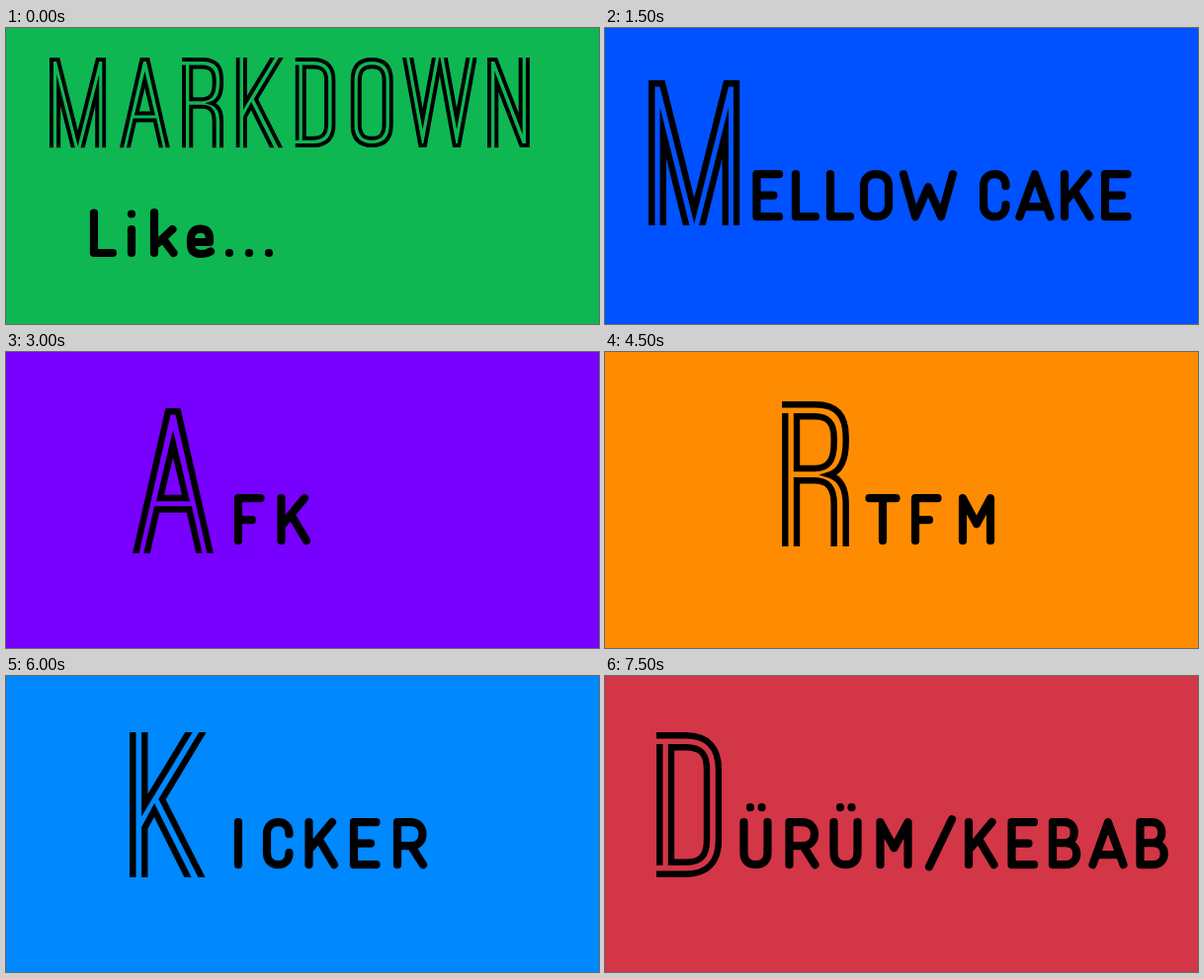
Animation, 600 px wide and 300 px high, one loop 8000 ms. Source, as an HTML page:

```html
<!DOCTYPE html>
<html lang="en">
<head>
<meta charset="utf-8">
<title>Markdown like...</title>
<style>
html, body { margin: 0; width: 100%; height: 100%; overflow: hidden; }
#stage { display: block; width: 600px; height: 300px; fill: none; stroke: #000; stroke-miterlimit: 10; }
.inline { stroke-width: 6.4; }
.round { stroke-width: 8.2; stroke-linecap: round; stroke-linejoin: round; }
</style>
</head>
<body>
<svg id="stage" viewBox="0 0 600 300" role="img"></svg>
<script>
// Striped capitals: [width, path], 147 units tall; limbs overrun the edge and are clipped flat.
const STRIPED = {
  M: [92.5, 'M3.3 152V3.3H14L46.3 132 78.6 3.3H89.2V152M14.8 152V53L39.5 152M53.1 152L77.8 53V152'],
  A: [82, 'M2.2 152L36 3.3H46L79.8 152M13.4 152L24.6 102.5H57.4L68.6 152M28 91L41 36 54 91Z'],
  R: [68, 'M0 3.3H34C56 3.3 64.7 15 64.7 36V41C64.7 60 59 71 48 74.5C59 78 64.7 88 64.7 104V152' +
          'M3.3 12V152M15 15.3H33C47 15.3 52.7 22 52.7 37V42C52.7 60 47 68 33 68H15Z' +
          'M15 152V80.3H33C47 80.3 52.7 88 52.7 104V152'],
  K: [78, 'M3.3 0V147M15.3 -5V74L63 -5M77 -5L33 68 77 155M15.3 152V97L25 79 63 155'],
  D: [66.5, 'M0 3.3H30C53 3.3 63 17 63 38V109C63 130 53 143.7 30 143.7H0M3.3 12V135' +
            'M15 15.3H30C46 15.3 51 23 51 38V109C51 124 46 131.7 30 131.7H15Z'],
  O: [70, 'M3.3 38C3.3 15 14 3.3 35 3.3S66.7 15 66.7 38V109C66.7 132 56 143.7 35 143.7S3.3 132 3.3 109Z' +
          'M15 38C15 22 21 15 35 15S55 22 55 38V109C55 125 49 132 35 132S15 125 15 109Z'],
  W: [122, 'M2.4 -5L29.5 143.7H37L61 12 85 143.7H92.5L119.6 -5M14 -5L33.2 100 52.4 -5M69.6 -5L88.8 100 108 -5'],
  N: [69.3, 'M3.3 152V3.3H14L54.3 108V-5M66 -5V143.7H55.3L15 39V152']
};

// Rounded capitals, drawn along the middle of the stroke.
const U = 'M0 0V31C0 39 5 43 12 43S24 39 24 31V0';
const ROUNDED = {
  A: 'M0 43L15.5 0 31 43M5 33H26',
  B: 'M0 21H13C28 21 28 43 13 43H0V0H12C25 0 25 21 12 21',
  C: 'M22.5 12C22.5 4 18 0 11.5 0S0 4 0 12V31C0 39 5 43 11.5 43S22.5 39 22.5 31',
  E: 'M22.5 0H0V43H22.5M0 21.5H17',
  F: 'M22.5 0H0V43M0 22H14',
  I: 'M0 0V43',
  K: 'M0 0V43M23.5 0L2 26M10 17L25.5 43',
  L: 'M0 0V43H20',
  M: 'M0 43V0L14 26 28 0V43',
  O: 'M0 12C0 4 5 0 12.5 0S25 4 25 12V31C25 39 20 43 12.5 43S0 39 0 31Z',
  R: 'M0 43V0H13C21 0 25.5 5 25.5 12S21 24 13 24H0M14 24L26 43',
  T: 'M0 0H27M13.5 0V43',
  U,
  'Ü': U + 'M6.5 -15h0M18 -15h0',
  W: 'M0 0L12 43 25 13 38 43 50 0',
  '/': 'M0 45L23 -3'
};

const striped = (letter, x, y, scale = 1) => {
  const [w, d] = STRIPED[letter];
  return `<svg class="inline" x="${x}" y="${y}" width="${w * scale}" height="${147 * scale}"
    viewBox="0 0 ${w} 147"><path d="${d}"/></svg>`;
};

const rounded = (text, xs) => [...text].map((letter, i) =>
  `<path class="round" transform="translate(${xs[i]} 148.2)" d="${ROUNDED[letter]}"/>`).join('');

const LIKE = 'M89 187.5V228H108M127 204V228M127 188.5h0M150 187V228M168.5 204L153 218.5M159 214L169.5 228' +
  'M187 217H206V214C206 207 203 203.6 196.5 203.6S187 208 187 214V219C187 226 191 229 198 229' +
  'Q203 229 207 226.5M226 228h0M246 228h0M266 228h0';

const titleXs = [44, 115, 178, 232.5, 292.5, 348.5, 401, 487];
const title = [...'MARKDOWN'].map((c, i) => striped(c, titleXs[i], 30, 0.62)).join('');

const SCENES = [
  ['Markdown like...', '#0eb752', title + `<path class="round" d="${LIKE}"/>`],
  ['Mellow cake', '#0051ff', striped('M', 44, 53) +
    rounded('ELLOWCAKE', [153.5, 193, 228, 262, 302, 383, 419.5, 465, 506])],
  ['AFK', '#7800ff', striped('A', 128, 57) + rounded('FK', [235, 278.5])],
  ['RTFM', '#ff8c00', striped('R', 179, 50) + rounded('TFM', [267.5, 314, 362])],
  ['Kicker', '#0088ff', striped('K', 125, 57) + rounded('ICKER', [235, 264, 306.5, 352, 396])],
  ['Dürüm/kebab', '#d33646', striped('D', 52, 57) +
    rounded('ÜRÜM/KEBAB', [140.5, 186.5, 231.5, 278.5, 328, 368, 411.5, 453, 493.5, 541.5])]
];

const LOOP = 8000, HOLD = 1500;
const stage = document.getElementById('stage');
const start = performance.now();
let shown = -1;

function show(index) {
  if (index === shown) return;
  shown = index;
  const [label, color, art] = SCENES[index];
  stage.setAttribute('aria-label', label);
  stage.innerHTML = `<rect width="600" height="300" fill="${color}" stroke="none"/>${art}`;
}

function tick() {
  show(Math.floor((performance.now() - start) % LOOP / HOLD));
  requestAnimationFrame(tick);
}
tick();
</script>
</body>
</html>
```
